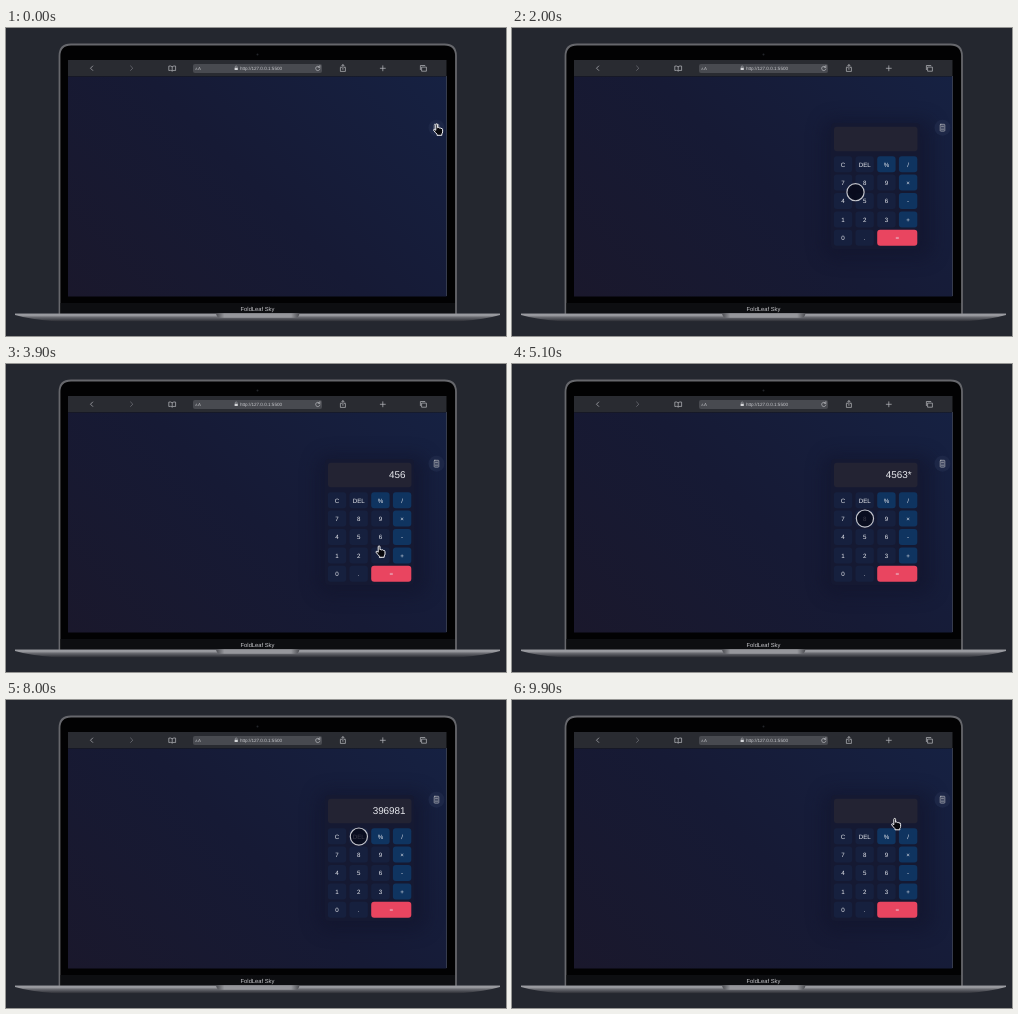
Animation of 500x308 px, one loop 10 s. Source, as an HTML page:

```html
<!DOCTYPE html>
<html lang="en">
<head>
<meta charset="utf-8">
<title>Calculator demo</title>
<style>
html, body { margin: 0; width: 100%; height: 100%; overflow: hidden; background: #24272f; }
svg { display: block; width: 500px; height: 308px; }
text { font-family: "Liberation Sans", Arial, sans-serif; fill: #e8e9ee; text-anchor: middle; text-rendering: geometricPrecision; }
.icon { fill: none; stroke: #bbbcc0; stroke-width: .7; stroke-linecap: round; stroke-linejoin: round; }
.url text { fill: #c6c7cb; }
#shade { filter: blur(9px); }
</style>
</head>
<body>
<svg viewBox="0 0 500 308">
  <defs>
    <linearGradient id="page" gradientUnits="userSpaceOnUse" x1="102" y1="308" x2="401" y2="9">
      <stop offset="0" stop-color="#1a182c"/><stop offset=".5" stop-color="#161a35"/><stop offset="1" stop-color="#162142"/>
    </linearGradient>
    <linearGradient id="metal" x1="0" y1="0" x2="0" y2="1">
      <stop offset="0" stop-color="#8f9096"/><stop offset=".2" stop-color="#a0a1a6"/>
      <stop offset=".5" stop-color="#65666c"/><stop offset="1" stop-color="#282a31"/>
    </linearGradient>
    <linearGradient id="notch">
      <stop offset="0" stop-color="#4a4b50"/><stop offset=".1" stop-color="#96979c"/>
      <stop offset=".9" stop-color="#96979c"/><stop offset="1" stop-color="#4a4b50"/>
    </linearGradient>
    <clipPath id="view"><path d="M62 48H440.5V268.5H62Z"/></clipPath>
  </defs>

  <!-- laptop -->
  <path d="M53.5 287V28Q53.5 16.5 65 16.5H438.5Q450 16.5 450 28V287Z" fill="#020203" stroke="#66676c" stroke-width="1.8"/>
  <circle cx="251.5" cy="26.5" r="1" fill="#23252b"/>
  <path d="M54.5 275H449V286H54.5Z" fill="#0d0e11"/>
  <text x="251.5" y="283" font-size="5.8" style="fill:#c8c8cc">FoldLeaf Sky</text>
  <path d="M9 285.5H494V287Q480 291 452 293.5H51Q23 291 9 287Z" fill="url(#metal)"/>
  <path d="M210 285.2H293.5Q293 289.8 289 289.8H214.5Q210.5 289.8 210 285.2Z" fill="url(#notch)"/>

  <!-- browser -->
  <path d="M62 32H440.5V48.5H62Z" fill="#292b31"/>
  <rect x="187" y="36" width="129" height="9" rx="2" fill="#484a50"/>
  <g class="url">
    <text x="190.4" y="41.6" font-size="3.4">A</text>
    <text x="193.4" y="41.6" font-size="4.3">A</text>
    <text x="255" y="41.7" font-size="4.6">http://127.0.0.1:5500</text>
  </g>
  <path d="M228.6 39.8H231.8V42H228.6Z" fill="#d4d5d8"/>
  <g class="icon">
    <path d="M229.3 39.6V38.8A.9 .9 0 0 1 231.1 38.8V39.6" stroke-width=".5"/>
    <path d="M86.7 38L84.5 40.2L86.7 42.4"/>
    <path d="M124.6 38L126.8 40.2L124.6 42.4" stroke="#777980"/>
    <path d="M166.2 38.7Q164.5 37.5 162.8 38.1V42.5Q164.5 42 166.2 42.9Q168 42 169.6 42.5V38.1Q168 37.5 166.2 38.7V42.9"/>
    <path d="M313.7 39.2A2.2 2.2 0 1 0 314 41M313.9 37.5V39.3H312.2"/>
    <path d="M335.5 39.4H334.4V43.4H339.4V39.4H338.3M336.9 41.4V36.8M335.4 38.1L336.9 36.6L338.4 38.1"/>
    <path d="M374.3 40.3H379.3M376.8 37.8V42.8"/>
    <path d="M416 39.1H420.4V43.2H416ZM414.4 41.6V37.5H418.8"/>
  </g>
  <path d="M62 48.5H440.5V268.5H62Z" fill="url(#page)"/>
  <path d="M440.5 48V268" stroke="#4a5062" stroke-width=".7"/>

  <g clip-path="url(#view)">
    <g id="calc">
      <rect id="shade" x="312" y="92" width="108" height="138" rx="10" fill="#11132a" opacity=".55"/>
      <rect x="319" y="95" width="89" height="126" rx="4" fill="#151932"/>
      <rect x="322" y="98.7" width="83.5" height="24.5" rx="3" fill="#232333"/>
      <text id="out" x="399.6" y="114.2" font-size="9.9" style="text-anchor:end"></text>
      <g id="keys"></g>
    </g>
    <circle cx="430.5" cy="99.7" r="8" fill="#1d2747"/>
    <g class="icon">
      <rect x="428.2" y="96.3" width="4.6" height="6.8" rx=".6"/>
      <path d="M429.5 98.2H431.5" stroke-width=".9"/>
      <path d="M429.5 100.1H432M429.5 101.6H432" stroke-dasharray="0 1"/>
    </g>
  </g>

  <g id="cursor">
    <path id="hand" d="M-2.2 .8V-4.6Q-2.2 -5.6 -1.3 -5.6Q-.4 -5.6 -.4 -4.6V-1.7Q.5 -2.5 1.3 -1.5Q2.2 -2.1 2.9 -1.1Q4.6 -1.5 4.6 .3V2.4Q4.6 3.7 3.8 4.4V5.8H-1V4.7Q-2.8 3 -4.4 .7Q-4.4 -.6 -3.2 -.1Z"
      fill="#08080c" stroke="#f2f2f5" stroke-linejoin="round"/>
    <circle id="ring" r="8.6" fill="#070817" fill-opacity=".78" stroke="#c3c4cb" stroke-width="1.2"/>
  </g>
</svg>
<script>
const LOOP = 10000, OPEN_AT = 830, OPEN_TIME = 500;
const PRESS = 150, TRAVEL = 450, LEAD = 40;
const el = id => document.getElementById(id);
const show = (id, on) => el(id).style.display = on ? "" : "none";
const clamp = u => Math.min(1, Math.max(0, u));

const labels = [..."C", "DEL", ..."%/789×456-123+0.="];
const spots = { icon: [432, 101.5], screen: [384, 124] };
const HALF = 9.2, PITCH = 21.7;

el("keys").innerHTML = labels.map((label, i) => {
  const x = 331 + i % 4 * PITCH, y = 136.2 + Math.floor(i / 4) * 18.4;
  const wide = label === "=" ? PITCH : 0, mid = x + wide / 2;
  const fill = wide ? "#e94560" : "%/×-+".includes(label) ? "#0f3460" : "#16203e";
  spots[label] = [mid, y];
  return `<rect x="${x - HALF}" y="${y - 8}" width="${2 * HALF + wide}" height="16" rx="3" fill="${fill}"/>
    <text x="${mid}" y="${y + 2.3}" font-size="6.2">${label}</text>`;
}).join("");

// where the pointer goes, and when it clicks there
const clicks = [
  ["icon", OPEN_AT], ["4", 2140], ["5", 2760], ["6", 3280], ["3", 4075], ["×", 4450],
  ["8", 5160], ["7", 5900], ["=", 6760], ["DEL", 8060], ["C", 8500]
];
const stops = [...clicks, ["=", 9250], ["screen", 9850]];

function type(text, key) {
  if (key === "icon" || key === "C") return "";
  if (key === "DEL") return text.slice(0, -1);
  if (key === "=") return String(text.split("*").reduce((a, b) => a * b));
  return text + (key === "×" ? "*" : key);
}

function pointerAt(t) {
  return stops.reduce(([x, y], [name, time]) => {
    const u = clamp((t - time + LEAD) / TRAVEL + 1), s = u * u * (3 - 2 * u);
    const [x1, y1] = spots[name];
    return [x + (x1 - x) * s, y + (y1 - y) * s];
  }, spots.icon);
}

const start = performance.now();

function draw() {
  const t = (performance.now() - start) % LOOP;
  const slide = clamp((t - OPEN_AT) / OPEN_TIME);
  show("calc", slide > 0);
  el("calc").setAttribute("transform", `translate(${140 * (1 - slide) ** 3})`);
  el("out").textContent = clicks.filter(c => c[1] <= t).reduce((text, c) => type(text, c[0]), "");

  const down = clicks.some(c => Math.abs(t - c[1]) < PRESS);
  show("ring", down);
  show("hand", !down);
  el("cursor").setAttribute("transform", `translate(${pointerAt(t)})`);
  requestAnimationFrame(draw);
}
draw();
</script>
</body>
</html>
```
